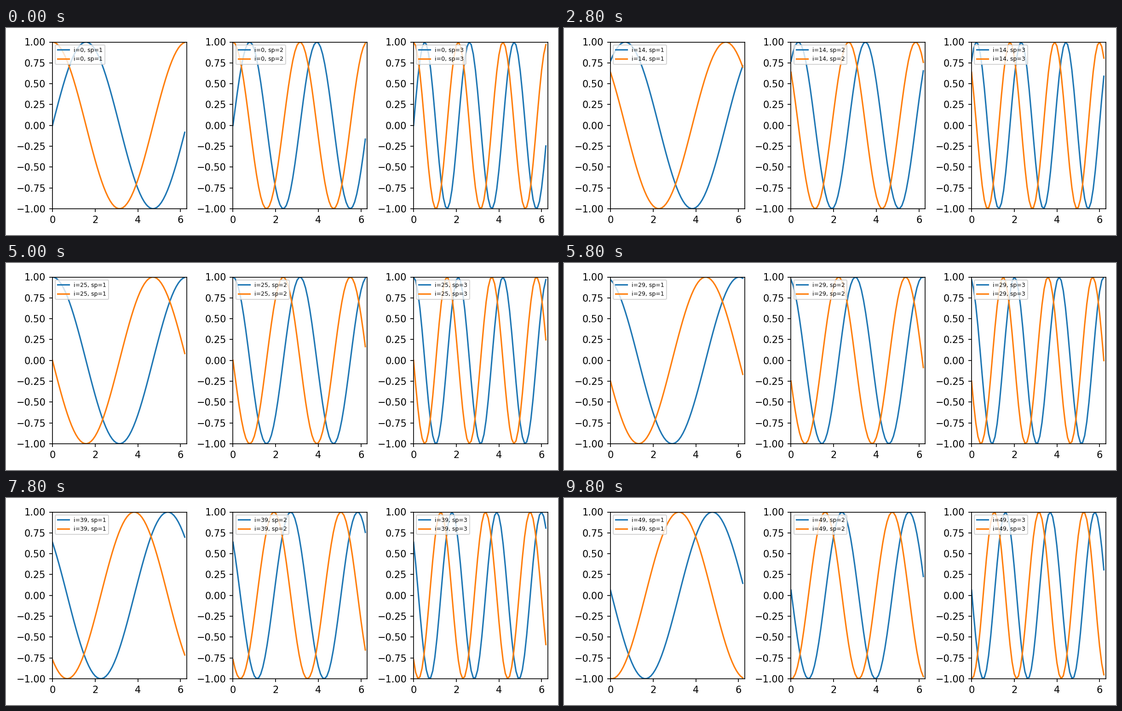
A matplotlib script that plays this animation: 1200x450 px, repeating every 10000 ms.

```python
import matplotlib.pyplot as plt
import numpy as np
from matplotlib.animation import FuncAnimation

FRAMES = 50
INTERVAL = 200

x = np.arange(0, 2 * np.pi, 0.1)
fig, axes = plt.subplots(1, 3, figsize=(8, 3), dpi=150)

panels = []
for speed, ax in enumerate(axes, start=1):
    ax.set(xlim=(0, 2 * np.pi), ylim=(-1, 1))
    lines = [ax.plot(x, wave(speed * x), label="i=0, sp=0")[0]
             for wave in (np.sin, np.cos)]
    panels.append((ax, speed, lines))
fig.tight_layout()


def update(i):
    phase = np.pi * i / FRAMES
    for ax, speed, lines in panels:
        for line, wave in zip(lines, (np.sin, np.cos)):
            line.set_ydata(wave(speed * x + phase))
            line.set_label(f"i={i}, sp={speed}")
        # Rebuilt each frame so the box fits the label width
        ax.legend(loc="upper left", fontsize=6)
    return []


anim = FuncAnimation(fig, update, frames=FRAMES, interval=INTERVAL,
                     init_func=lambda: update(0), repeat=True, repeat_delay=0)
plt.show()
```
